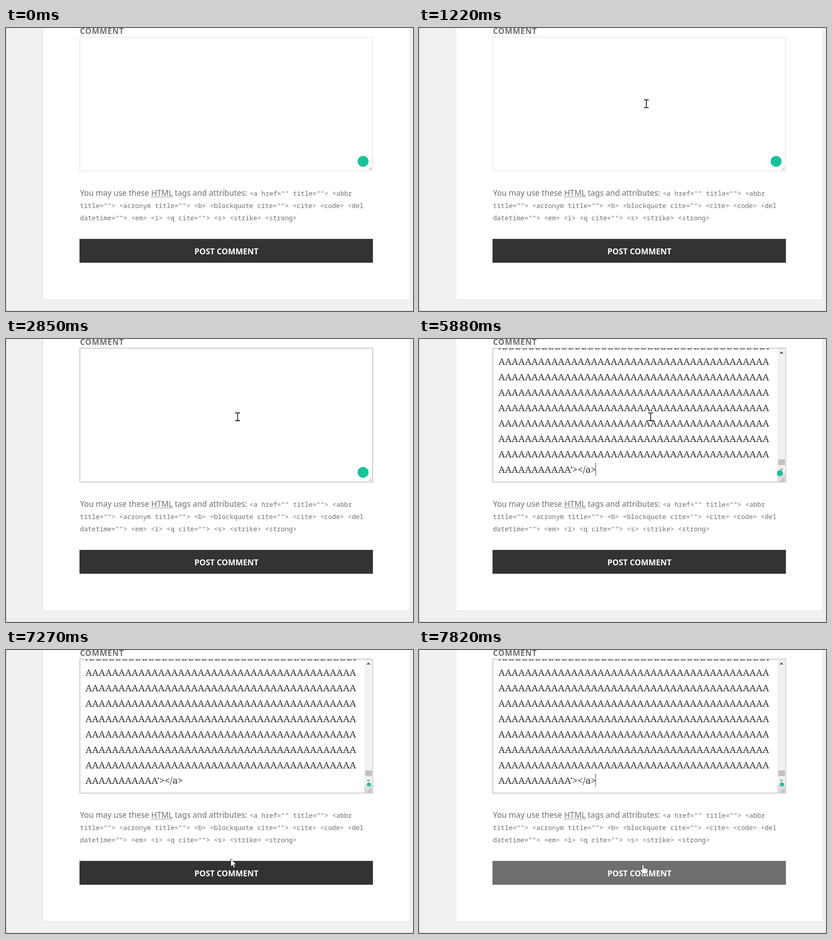
An HTML page for the animation above (8000 ms loop, 897 by 624 pixels).

```html
<!DOCTYPE html>
<html lang="en">
<head>
<meta charset="utf-8">
<title>Comment form</title>
<style>
  html, body { margin: 0; width: 100%; height: 100%; overflow: hidden; background: #f1f1f1; }
  svg { display: block; width: 897px; height: 624px; }
  text { white-space: pre; fill: #707070; font: 17.38px "Noto Sans", "Open Sans", sans-serif; }
  .label { font-weight: 700; letter-spacing: .05em; }
  .code { font: 14.48px "Noto Sans Mono", "DejaVu Sans Mono", monospace; }
  .send { font-size: 17.5px; font-weight: 700; fill: #fff; text-anchor: middle; }
  .typed { font: 20.65px "Noto Serif", serif; fill: #333; }
  .dots { stroke: #707070; stroke-dasharray: 1 1; }
</style>
</head>
<body>
<svg viewBox="0 0 897 624">
  <defs>
    <clipPath id="inner"><rect x="163" y="21" width="627" height="294"/></clipPath>
  </defs>
  <rect width="897" height="624" fill="#f1f1f1"/>
  <path d="M.5 0V623.5H897" fill="none" stroke="#c8c8c8"/>
  <rect x="81.5" y="-2" width="809" height="601" fill="#fff" stroke="#dfdfdf"/>

  <text class="label" x="163" y="13">COMMENT</text>
  <rect id="box" x="162.75" y="20.25" width="645.5" height="295.25" fill="#fff"/>

  <g id="filled">
    <g id="rows" clip-path="url(#inner)"></g>
    <rect x="790" y="21" width="17.5" height="276" fill="#f1f1f1"/>
    <rect x="791.5" y="265.5" width="15" height="12.5" fill="#c1c1c1"/>
    <path d="M794.5 32l4.3-4.6 4.3 4.6z" fill="#505050"/>
    <path d="M794.5 286l4.3 4.4 4.3-4.4z" fill="#a3a3a3"/>
    <rect x="789.5" y="297" width="18" height="18" fill="#dcdcdc"/>
    <path d="M797 314l9-9M802 314l4-4" stroke="#777" fill="none"/>
  </g>
  <path id="grip" d="M799.5 313.5l6.5-6.5M803.5 313.5l2.5-2.5" stroke="#777" fill="none"/>
  <rect id="caret" width="1" height="28" fill="#333"/>
  <circle id="badge" fill="#15c39a"/>

  <text x="163" y="370">You may use these </text>
  <text x="320" y="370">HTML</text>
  <path class="dots" d="M320 371.5H367M320 373.5H367"/>
  <text x="372" y="370">tags and attributes:</text>
  <text class="code" x="537" y="370">&lt;a href="" title=""&gt; &lt;abbr</text>
  <text class="code" x="163" y="397">title=""&gt; &lt;acronym title=""&gt; &lt;b&gt; &lt;blockquote cite=""&gt; &lt;cite&gt; &lt;code&gt; &lt;del</text>
  <text class="code" x="163" y="424">datetime=""&gt; &lt;em&gt; &lt;i&gt; &lt;q cite=""&gt; &lt;s&gt; &lt;strike&gt; &lt;strong&gt;</text>

  <rect id="button" x="162" y="465" width="646.7" height="52.6"/>
  <text class="send" x="485.8" y="499">POST COMMENT</text>

  <g id="beam" fill="none" stroke="#000" stroke-width="1.6">
    <path d="M-5.3-8.6H-1.6L0-7.6 1.6-8.6H5.3M0-8V8M-5.3 8.6H-1.6L0 7.6 1.6 8.6H5.3"/>
  </g>
  <g id="arrow">
    <path d="M.5.5V17.6L4.4 14 7 20.2 10 19 7.4 12.9H12.6Z" fill="#fff" stroke="#222" stroke-width=".9"/>
  </g>
  <g id="hand" stroke="#222" stroke-linejoin="round">
    <path d="M-2 1.5Q0-.8 2 1.5V7Q4 5.6 5.2 7.6 7.2 6.4 8.2 8.6 11 8 11 10.6V15.4L9.2 20.6H-.6L-5.8 13.4Q-6.6 10.4-4 10.6L-2 12.6Z" fill="#fff"/>
    <path d="M2 7V11M5.2 7.6V11.4M8.2 8.6V11.8" stroke-width=".8"/>
  </g>
</svg>
<script>
const LOOP = 8000, FOCUS = 1400, PASTE = 5880, HOVER = 7360;
const $ = id => document.getElementById(id);
const set = (id, attrs) => {
  for (const key in attrs) $(id).setAttribute(key, attrs[key]);
};
const show = (id, on) => set(id, { visibility: on ? "visible" : "hidden" });
const at = (steps, t) => steps.filter(s => s[0] <= t).pop();

// Nine scrolled lines; the topmost is clipped by the box.
for (let i = 0; i < 9; i++) {
  const row = document.createElementNS("http://www.w3.org/2000/svg", "text");
  row.setAttribute("class", "typed");
  row.setAttribute("x", 175);
  row.setAttribute("y", 22.5 + 34 * i);
  row.textContent = i < 8 ? "A".repeat(41) : "A".repeat(11) + "'></a>";
  $("rows").append(row);
}

// time, x, y, shape
const pointer = [
  [0, 0, 0, ""],
  [660, 693, 498, "arrow"],
  [740, 638, 402, "arrow"],
  [820, 574, 290, "beam"],
  [900, 530.5, 217.5, "beam"],
  [1000, 516, 184, "beam"],
  [1070, 516, 173, "beam"],
  [1220, 501, 167, "beam"],
  [FOCUS, 510.5, 171.5, "beam"]
];
for (let i = 1; i <= 10; i++) {
  const p = i / 10, ease = p * p * (3 - 2 * p);
  const y = 171.5 + 288.5 * ease;
  const overText = y < 316 || (y > 352 && y < 430);
  pointer.push([6570 + 700 * (i - 1) / 9, 510.5 - 15.5 * ease, y, overText ? "beam" : "arrow"]);
}
pointer.push([HOVER, 493.5, 473, "hand"]);

// time, x, y, radius
const badge = [
  [0, 787, 294, 12],
  [PASTE, 795.5, 296, 6.8],
  [5940, 797.5, 296, 5.8],
  [6020, 799.8, 296.4, 4.5]
];

// time, visible
const blink = [
  [0, 0], [FOCUS, 1], [1850, 0], [2310, 1], [2850, 0],
  [PASTE, 1], [7270, 0], [7820, 1]
];

function draw(t) {
  const pasted = t >= PASTE;
  set("box", t < FOCUS
    ? { stroke: "#e0e0e0", "stroke-width": 1.2 }
    : { stroke: "#bababa", "stroke-width": 1.5 });
  show("filled", pasted);
  show("grip", !pasted);
  set("caret", pasted ? { x: 389, y: 273 } : { x: 174, y: 35 });
  show("caret", at(blink, t)[1]);

  const [, cx, cy, r] = at(badge, t);
  set("badge", { cx, cy, r });
  set("button", { fill: t < HOVER ? "#333" : "#6e706f" });

  const [, x, y, shape] = at(pointer, t);
  for (const id of ["beam", "arrow", "hand"]) {
    show(id, id === shape);
    set(id, { transform: `translate(${x} ${y})` });
  }
}

const start = performance.now();
function tick() {
  draw((performance.now() - start) % LOOP);
  requestAnimationFrame(tick);
}
tick();
</script>
</body>
</html>
```
